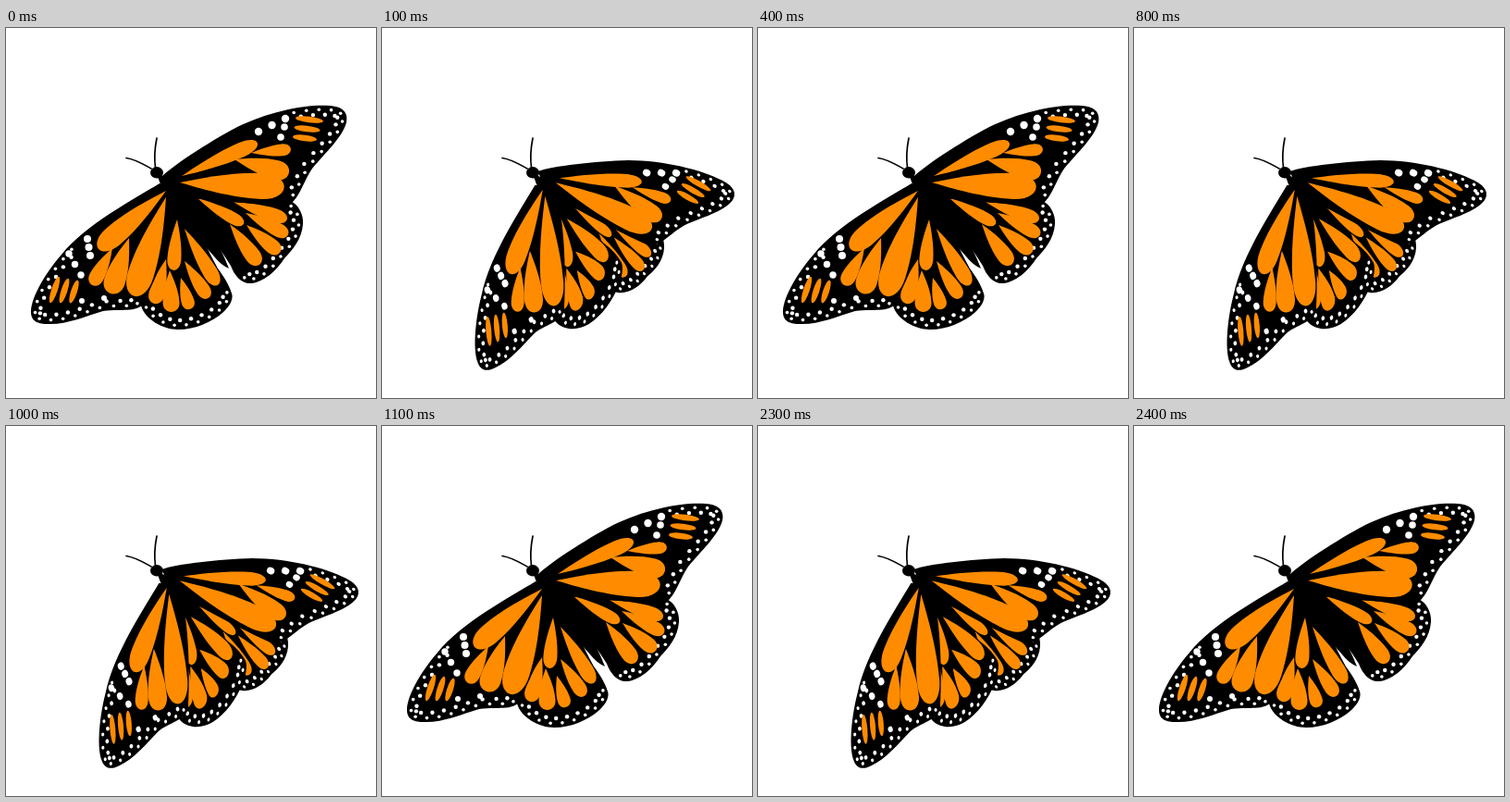
Animation of 400x400 px, one loop 2.9 s. Source, as an HTML page:

```html
<!DOCTYPE html>
<html lang="en">
<head>
<meta charset="utf-8">
<title>Butterfly</title>
<style>
  html, body { margin: 0; width: 100%; height: 100%; overflow: hidden; background: #fff; }
  svg { display: block; width: 100%; height: 100%; }
  .cell { fill: #ff8c00; }
  .spot { fill: #fff; }
  .feeler { fill: none; stroke: #000; stroke-width: 1.7; stroke-linecap: round; }
</style>
</head>
<body>
<svg id="stage" viewBox="0 0 400 400"></svg>
<script>
const stage = document.getElementById('stage');

function add(parent, tag, attrs) {
  const el = document.createElementNS('http://www.w3.org/2000/svg', tag);
  for (const key in attrs) el.setAttribute(key, attrs[key]);
  return parent.appendChild(el);
}

// Parts are drawn open; three anchor points (root, tip, heel) carry them to each pose.
// cells: [x0, y0, x1, y1, width]   rows: [x0, y0, x1, y1, count, radius]
// stripes: [x, y, dx, dy, angle]   rim: [from, to, side] along the outline
const body = {
  outline: 'M163 158C175 161 191 171 201 188C216 209 231 234 241 260Q232 256 225 247C205 225 185 195 167 169Z',
  open: [[163, 156], [241, 260], [201, 190]],
  shut: [[163, 156], [224, 233], [193, 181]]
};
const rightHind = {
  outline: 'M186 173L307 187C316 190 322 202 321 212C320 228 309 241 301 249C292 263 278 275 265 276C255 277 247 268 243 257C236 246 227 232 218 222L190 182Z',
  open: [[178, 168], [321, 212], [265, 276]],
  half: [[178, 168], [305, 238], [255, 286]],
  shut: [[178, 168], [270, 262], [238, 246]],
  cells: [[246, 188, 304, 207, 15], [207, 184, 257, 212, 13], [259, 200, 305, 224, 15],
    [260, 213, 296, 243, 16], [242, 212, 274, 256, 17]],
  rim: [126, 258, 1]
};
const leftHind = {
  outline: 'M178 176C165 220 142 280 146 300C150 315 170 326 186 326C205 326 222 318 234 308C243 300 246 292 244 287C241 277 235 268 229 260C218 240 204 210 190 180Z',
  open: [[170, 172], [178, 307], [228, 277]],
  half: [[170, 172], [212, 305], [243, 250]],
  shut: [[170, 172], [237, 289], [232, 244]],
  cells: [[185, 207, 181, 262, 15], [193, 217, 229, 278, 16], [173, 250, 160, 298, 17],
    [177, 262, 179, 307, 18], [189, 270, 199, 304, 14], [193, 252, 219, 292, 15]],
  rim: [133, 262, -1]
};
const rightFore = {
  outline: 'M166 163C178 150 218 124 250 107C285 90 325 82 350 84C365 85 370 92 368 102C364 118 345 135 331 152C322 165 318 182 307 191C280 192 230 187 200 184L178 176Z',
  open: [[178, 168], [366, 92], [299, 183]],
  half: [[178, 164], [380, 178], [286, 226]],
  shut: [[178, 168], [330, 294], [265, 256]],
  cells: [[190, 160, 272, 124, 16], [265, 135, 308, 131, 13], [247, 142, 306, 157, 21],
    [188, 167, 301, 172, 28]],
  stripes: [328, 99, -2.5, 10, 7],
  rows: [[273, 112, 302, 98, 3, 4.2], [297, 118, 301, 107, 2, 3.8]],
  rim: [165, 335, 1]
};
const leftFore = {
  outline: 'M166 168C140 184 85 213 60 245C45 262 27 290 27 307C27 318 36 320 45 320C65 321 85 312 105 306C122 303 136 308 147 300C160 275 178 235 185 200L182 176Z',
  open: [[170, 172], [28, 312], [140, 288]],
  half: [[170, 172], [106, 366], [187, 298]],
  shut: [[170, 172], [256, 345], [235, 283]],
  cells: [[173, 176, 100, 239, 23], [115, 238, 93, 278, 16], [133, 227, 113, 287, 23],
    [173, 183, 138, 290, 28]],
  stripes: [52.5, 283, 10.5, 1, 108],
  rows: [[88, 228, 91, 246, 3, 4], [68, 244, 81, 267, 3, 3.7], [82, 295, 106, 292, 2, 3]],
  rim: [120, 330, -1]
};
const parts = [body, rightHind, leftHind, rightFore, leftFore];

// A teardrop: pointed at the start, blunt at the end.
function teardrop(x0, y0, x1, y1, w) {
  const dx = x1 - x0, dy = y1 - y0, len = Math.hypot(dx, dy);
  const at = (s, side) => {
    const k = side * w / len;
    return `${x0 + s * dx - k * dy} ${y0 + s * dy + k * dx} `;
  };
  return `M${at(0, 0)}C${at(.2, .2)}${at(.5, .5)}${at(.78, .5)}` +
    `C${at(1.07, .5)}${at(1.07, -.5)}${at(.78, -.5)}C${at(.5, -.5)}${at(.2, -.2)}${at(0, 0)}Z`;
}

function spot(g, cx, cy, r) {
  add(g, 'circle', { cx, cy, r, class: 'spot' });
}

// Two staggered rows of dots follow the outline on its inner side.
function drawRim(g, path, [from, to, side]) {
  for (let s = from, i = 0; s <= to; s += 7, i++) {
    const p = path.getPointAtLength(s), q = path.getPointAtLength(s + 1);
    const inset = side * (i % 2 ? 10 : 4.5);
    spot(g, p.x - (q.y - p.y) * inset, p.y + (q.x - p.x) * inset, i % 2 ? 2.2 : 1.8);
  }
}

function draw(part) {
  const g = part.node = add(stage, 'g', {});
  const path = add(g, 'path', { d: part.outline });
  if (part.rim) drawRim(g, path, part.rim);
  for (const [x0, y0, x1, y1, n, r] of part.rows || [])
    for (let i = 0; i < n; i++) {
      const k = i / (n - 1);
      spot(g, x0 + k * (x1 - x0), y0 + k * (y1 - y0), r);
    }
  for (const cell of part.cells || [])
    add(g, 'path', { d: teardrop(...cell), class: 'cell' });
  if (part.stripes) {
    const [x, y, dx, dy, turn] = part.stripes;
    for (let i = 0; i < 3; i++) {
      const cx = x + i * dx, cy = y + i * dy;
      add(g, 'ellipse', { cx, cy, rx: 15 - i, ry: 3.4, class: 'cell', transform: `rotate(${turn} ${cx} ${cy})` });
    }
  }
}

// The affine map that takes triangle p to triangle q.
function fit(p, q) {
  const edge = (t, i, axis) => t[i][axis] - t[0][axis];
  const ux = edge(p, 1, 0), uy = edge(p, 1, 1), vx = edge(p, 2, 0), vy = edge(p, 2, 1);
  const det = ux * vy - uy * vx;
  const [x, y] = p[0];
  const [[a, c, e], [b, d, f]] = [0, 1].map(axis => {
    const u = edge(q, 1, axis), v = edge(q, 2, axis);
    const kx = (u * vy - v * uy) / det, ky = (v * ux - u * vx) / det;
    return [kx, ky, q[0][axis] - kx * x - ky * y];
  });
  return `matrix(${a} ${b} ${c} ${d} ${e} ${f})`;
}

function setPose(pose) {
  for (const part of parts)
    part.node.setAttribute('transform', fit(part.open, part[pose] || part.open));
}

parts.forEach(draw);
add(stage, 'ellipse', { cx: 163, cy: 156.3, rx: 7, ry: 6.2 });
add(stage, 'path', { class: 'feeler', d: 'M161.5 151C160 140 161 129 163 119' });
add(stage, 'path', { class: 'feeler', d: 'M157 152C148 147 140 142 130 140.5' });

// Bursts of beats, one each 100 ms: start time, first beat, last beat.
const LOOP = 2900, BEAT = 100;
const cycle = ['open', 'half', 'shut', 'half'];
const bursts = [[0, 0, 4], [800, 5, 10], [2300, 11, 12]];

function poseAt(t) {
  const [begin, first, last] = bursts.filter(burst => burst[0] <= t).pop();
  return cycle[Math.min(first + Math.floor((t - begin) / BEAT), last) % cycle.length];
}

const start = performance.now();
let shown = '';
function tick(now) {
  const pose = poseAt(Math.max(0, now - start) % LOOP);
  if (pose !== shown) setPose(shown = pose);
  requestAnimationFrame(tick);
}
tick(start);
</script>
</body>
</html>
```
